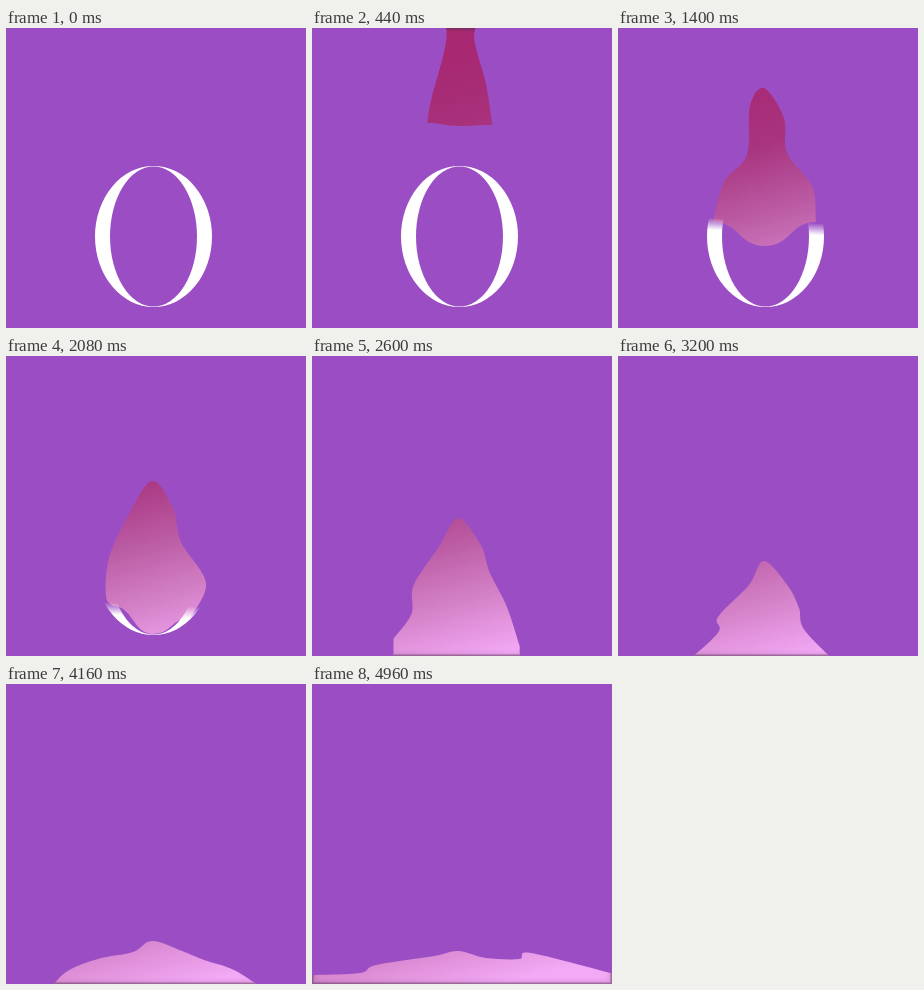
These frames come from a looping animation (300x300 px, 5000 ms). An HTML page with a canvas:

```html
<!DOCTYPE html>
<html lang="en">
<head>
<meta charset="utf-8">
<title>Melting letter</title>
<style>
  html, body { margin: 0; height: 100%; overflow: hidden; background: #9b4ec4; }
  canvas { display: block; width: 100vw; height: 100vh; }
</style>
</head>
<body>
<canvas id="stage" width="300" height="300"></canvas>
<script>
const ctx = document.getElementById('stage').getContext('2d');
const LOOP = 5000, STEP = 40, SIZE = 300;

// Each side runs as x, y pairs: left goes up to the top, right goes down from it.
const pose = (time, top, tip, left, right) =>
  ({ time, values: [...left, 146, top, ...right, 147, tip] });

const poured = pose(800, 3, 150, [112,147, 116,124, 133,62, 127,16], [168,35, 164,63, 177,108, 184,149]);

// The entry is the poured shape, narrower and higher up.
const raised = (time, dy) => ({
  time,
  values: poured.values.map((v, i) => i % 2 ? v - dy : 147 + (v - 147) * 0.9)
});

const poses = [
  raised(0, 151),
  raised(560, 25),
  poured,
  pose(1400, 60, 218, [95,194, 106,154, 129,127, 132,78], [166,90, 169,125, 194,158, 198,194]),
  pose(2080, 125, 278, [107,250, 100,240, 103,202, 122,160], [167,152, 175,186, 200,227, 184,262]),
  pose(3200, 205, 425, [52,320, 99,278, 100,261, 131,229], [170,230, 181,252, 188,276, 235,322]),
  pose(4160, 257, 425, [40,310, 60,288, 92,275, 127,268], [176,267, 198,276, 228,286, 262,308]),
  pose(4960, 267, 425, [0,291, 48,289, 64,281, 122,272], [174,274, 207,275, 219,269, 302,290])
];

const tint = ctx.createLinearGradient(110, 0, 190, SIZE);
['#a8286e', '#a72a75', '#a9357f', '#ba5aa3', '#d482c8', '#f3a9f6']
  .forEach((color, i, all) => tint.addColorStop(i / (all.length - 1), color));

const letter = new Path2D();
letter.ellipse(147.5, 208.5, 58.5, 70.5, 0, 0, 2 * Math.PI);
letter.closePath();
letter.ellipse(147.5, 208.5, 43.5, 70, 0, 0, 2 * Math.PI);

function poseAt(t) {
  const i = Math.max(1, poses.findIndex(p => p.time >= t));
  const a = poses[i - 1], b = poses[i];
  const k = (t - a.time) / (b.time - a.time);
  const mixed = a.values.map((v, j) => v + (b.values[j] - v) * k);
  const points = [];
  for (let j = 0; j < mixed.length; j += 2) points.push([mixed[j], mixed[j + 1]]);
  return points;
}

function blobPath(points) {
  const side = points.slice(0, -1), [tipX, tipY] = points.at(-1);
  const left = side[0], right = side.at(-1);
  const drop = Math.max(0, tipY - SIZE);
  const path = new Path2D();
  path.moveTo(...left);
  for (let i = 0; i < side.length - 1; i++) {
    const p = side[i], q = side[i + 1];
    const before = side[i - 1] || p, after = side[i + 2] || q;
    path.bezierCurveTo(
      p[0] + (q[0] - before[0]) / 6, p[1] + (q[1] - before[1]) / 6,
      q[0] - (after[0] - p[0]) / 6, q[1] - (after[1] - p[1]) / 6, ...q);
  }
  const rightX = (right[0] + tipX) / 2, leftX = (left[0] + tipX) / 2;
  path.lineTo(right[0], right[1] + drop);
  path.bezierCurveTo(rightX, right[1] + drop, rightX, tipY, tipX, tipY);
  path.bezierCurveTo(leftX, tipY, leftX, left[1] + drop, left[0], left[1] + drop);
  path.closePath();
  return path;
}

function drawBlob(points) {
  const path = blobPath(points);
  ctx.fillStyle = tint;
  ctx.fill(path);
  // Soft shade where the blob meets the stage edge
  ctx.save();
  ctx.clip(path);
  ctx.strokeStyle = 'rgba(80, 50, 80, 0.45)';
  ctx.shadowColor = 'rgba(80, 50, 80, 0.7)';
  ctx.shadowBlur = 5;
  ctx.lineWidth = 3;
  ctx.strokeRect(0, 0, SIZE, SIZE);
  ctx.restore();
}

function drawLetter(meltY) {
  const fade = ctx.createLinearGradient(95, meltY - 4, 94.4, meltY + 8);
  fade.addColorStop(0, 'rgba(255, 255, 255, 0)');
  fade.addColorStop(1, '#fff');
  ctx.fillStyle = fade;
  ctx.fill(letter, 'evenodd');
}

function frame(now) {
  const t = Math.floor(now % LOOP / STEP) * STEP;
  const points = poseAt(t);
  ctx.fillStyle = '#9b4ec4';
  ctx.fillRect(0, 0, SIZE, SIZE);
  drawBlob(points);
  drawLetter(points[0][1] + Math.max(0, t - 2080) * 0.15);
  requestAnimationFrame(frame);
}
requestAnimationFrame(frame);
</script>
</body>
</html>
```
